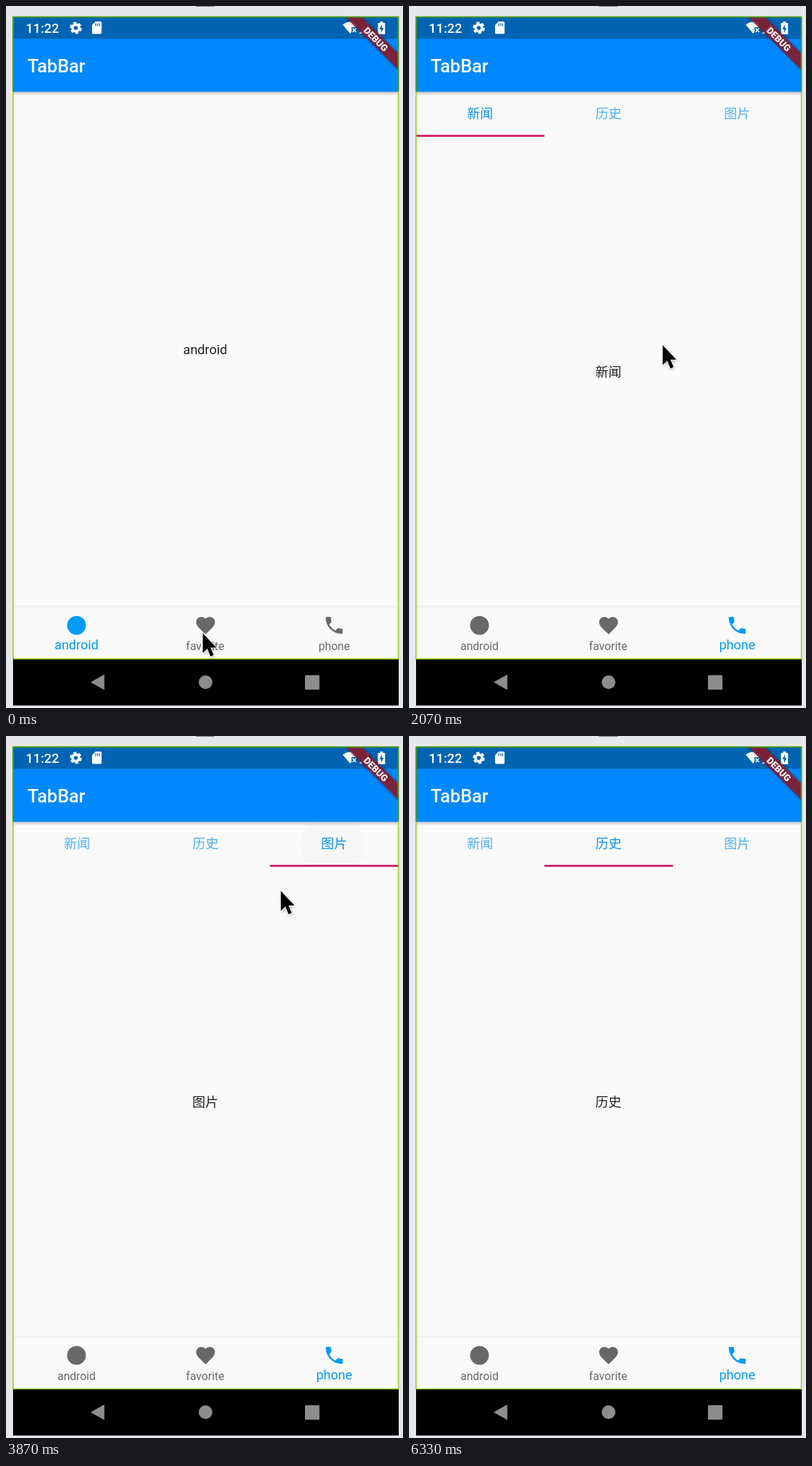
Recreate the animation shown at these times as an HTML page. Size 563 by 994 pixels, loop 6540 ms.

```html
<!DOCTYPE html>
<html lang="en">
<head>
<meta charset="utf-8">
<title>TabBar</title>
<style>
  html, body { margin: 0; width: 100%; height: 100%; overflow: hidden; background: #e7e8ec; }
  svg { display: block; width: 563px; height: 994px; font-family: Roboto, "Noto Sans CJK SC", "Noto Sans CJK", sans-serif; }
  .mid { text-anchor: middle; }
  .page { font-size: 18.5px; fill: #212121; }
  .tab { font-size: 18.5px; fill: #0c94ee; }
</style>
</head>
<body>
<svg viewBox="0 0 563 994">
  <defs>
    <clipPath id="screen"><rect x="10" y="15" width="546.5" height="910"/></clipPath>
    <clipPath id="inkArea"><rect id="inkRect"/></clipPath>
    <linearGradient id="fade" x2="0" y2="1">
      <stop stop-color="#000" stop-opacity=".24"/><stop offset="1" stop-color="#000" stop-opacity="0"/>
    </linearGradient>
    <filter id="soft" x="-50%" y="-50%" width="200%" height="200%"><feGaussianBlur stdDeviation="2.2"/></filter>
  </defs>

  <rect x="268" y="-6" width="29" height="7" rx="3" fill="#77747a"/>
  <rect x="10" y="925" width="547" height="65.5"/>
  <g fill="#8d8d8d">
    <path d="M120 957.5L139.500 946.500V968.500Z"/>
    <circle cx="283" cy="957.500" r="9.700"/>
    <rect x="424" y="947.500" width="20.500" height="20.500" rx="1"/>
  </g>

  <g clip-path="url(#screen)">
    <rect x="10" y="15" width="547" height="910" fill="#fafafa"/>
    <text id="plain" class="mid page" x="282.500" y="493"></text>
    <g id="tabs"></g>
    <rect id="line" y="182.500" width="182.300" height="2.700" fill="#c9125f"/>

    <rect x="10" y="121" width="547" height="6" fill="url(#fade)"/>
    <rect x="10" y="46" width="547" height="75.500" fill="#0089ff"/>
    <rect x="10" y="15" width="547" height="31.500" fill="#0064b2"/>
    <text x="30.500" y="94" font-size="26" font-weight="500" fill="#fff">TabBar</text>
    <text x="28" y="38" font-size="18.600" font-weight="500" fill="#fff">11:22</text>

    <g fill="none" stroke="#fff">
      <circle cx="99" cy="31" r="4.700" stroke-width="3.800"/>
      <circle cx="99" cy="31" r="7" stroke-width="3" stroke-dasharray="4.300 3.030"/>
    </g>
    <path d="M127 22H134Q135.500 22 135.500 23.500V38Q135.500 39.500 134 39.500H123.500Q122 39.500 122 38V27Z" fill="#fff"/>
    <path d="M127.300 24.500v4M130 24.500v4M132.700 24.500v4" stroke="#0064b2" stroke-width="1.200"/>
    <path d="M477.500 26.500Q488 18.500 498.500 26.500L496 30H490V36.500L488 39Z" fill="#fff"/>
    <path d="M491.500 31.500l5 5.500m0-5.500l-5 5.500" stroke="#fff" stroke-width="1.500"/>
    <path d="M500.500 39H514V24Z" fill="#fff"/>
    <path d="M527.500 24H530.500V22H534.500V24H537.500V40H527.500Z" fill="#fff"/>
    <path d="M533 26L529.500 33H532V38L535.500 31H533Z" fill="#0064b2"/>

    <g transform="translate(556.500 15) rotate(45)">
      <rect x="-80" y="37.300" width="160" height="16" opacity=".5" filter="url(#soft)"/>
      <rect x="-80" y="37.300" width="160" height="16" fill="#842139" opacity=".93"/>
      <text class="mid" y="50" font-size="13.200" font-weight="900" fill="#fff">DEBUG</text>
    </g>

    <rect x="10" y="849" width="547" height="3" fill="#f1f1f1"/>
    <rect x="10" y="851.500" width="547" height="73.500" fill="#fafafa"/>
    <g clip-path="url(#inkArea)"><circle id="ink"/></g>
    <g id="nav">
      <g><circle cx="100" cy="877" r="13.300"/><text class="mid" x="100">android</text></g>
      <g>
        <path transform="translate(267 861) scale(1.333)" d="M12 21.35l-1.45-1.32C5.4 15.36 2 12.28 2 8.5 2 5.42 4.42 3 7.5 3c1.74 0 3.41.81 4.5 2.09C13.09 3.81 14.76 3 16.5 3 19.58 3 22 5.42 22 8.5c0 3.78-3.4 6.86-8.55 11.54z"/>
        <text class="mid" x="282.500">favorite</text>
      </g>
      <g>
        <path transform="translate(449.500 861) scale(1.333)" d="M6.62 10.79c1.44 2.83 3.76 5.14 6.59 6.59l2.2-2.2c.27-.27.67-.36 1.02-.24 1.12.37 2.33.57 3.57.57.55 0 1 .45 1 1V20c0 .55-.45 1-1 1-9.39 0-17-7.61-17-17 0-.55.45-1 1-1h3.5c.55 0 1 .45 1 1 0 1.25.2 2.45.57 3.57.11.35.03.74-.25 1.02z"/>
        <text class="mid" x="465.500">phone</text>
      </g>
    </g>
  </g>
  <rect x="10" y="15.500" width="546.500" height="909" fill="none" stroke="#95cc18" stroke-width="1.500"/>
  <path d="M10 121V15.500H556.500V121" fill="none" stroke="#3f9418" stroke-width="1.500"/>

  <g id="cursor">
    <path d="M0 0V28L6.500 22L11 33L15.500 31L11 20.500H19.500Z" transform="translate(1 2)" opacity=".35" filter="url(#soft)"/>
    <path d="M0 0V28L6.500 22L11 33L15.500 31L11 20.500H19.500Z" stroke="#fff" stroke-width="1.800" paint-order="stroke"/>
  </g>
</svg>

<script>
const LOOP = 6540, LEFT = 10, WIDTH = 547, TAB = WIDTH / 3;
const names = ['android', 'favorite', 'phone'];
const titles = ['新闻', '历史', '图片'];
const navClicks = [-1000, 330, 1230];
const tabClicks = [3085, 3560];
const path = [
  [0, 279, 888], [400, 279, 888], [1000, 470, 878], [1470, 478, 876], [1560, 478, 876],
  [2050, 360, 481], [2730, 266, 200], [2960, 280, 150], [3090, 282, 150],
  [3270, 444, 153], [3450, 462, 152], [3640, 462, 152], [4400, 135, 458],
  [4560, 90, 468], [5200, 562, 455], [5300, 610, 455]
];
const swipe = [[4560, 2], [4980, 1.12], [5200, .967], [5250, .967], [5480, 1]];

const $ = id => document.getElementById(id);
const clamp = v => Math.min(1, Math.max(0, v));
const ease = p => 1 - (1 - clamp(p)) ** 3;
const smooth = p => p * p * (3 - 2 * p);
const set = (el, attrs) => { for (const k in attrs) el.setAttribute(k, attrs[k]); };

// Interpolates one column of a list of [time, ...values].
function track(keys, t, col) {
  const i = keys.findIndex(k => k[0] > t);
  if (i < 0) return keys[keys.length - 1][col];
  if (i === 0) return keys[0][col];
  const a = keys[i - 1], b = keys[i];
  return a[col] + (b[col] - a[col]) * smooth((t - a[0]) / (b[0] - a[0]));
}

function scroll(t, duration) {
  if (t >= swipe[0][0]) return track(swipe, t, 1);
  return tabClicks.reduce((sum, c) => sum + ease((t - c) / duration), 0);
}

function label(cls, y, text) {
  const el = document.createElementNS('http://www.w3.org/2000/svg', 'text');
  set(el, { class: 'mid ' + cls, y });
  el.textContent = text;
  return $('tabs').appendChild(el);
}
const tabLabels = titles.map((s, i) => {
  const el = label('tab', 159, s);
  el.setAttribute('x', LEFT + TAB * (i + .5) - .5);
  return el;
});
const pages = titles.map(s => label('page', 525, s));
const navItems = [...$('nav').children];

// Ink splashes: time, centre and the clipped area's left, top, width, height.
const inks = [
  [330, 283, 888, 192, 852, 182, 73], [1230, 465, 888, 374, 852, 182, 73],
  [3085, 282, 152, 192, 122, 182, 63], [3560, 463, 154, 374, 122, 183, 63]
];

function drawInk(t) {
  const hit = inks.filter(k => k[0] <= t).pop();
  const age = hit ? t - hit[0] : 1e4;
  $('ink').setAttribute('opacity', hit ? .035 * clamp((420 - age) / 260) : 0);
  if (!hit) return;
  const [, cx, cy, x, y, width, height] = hit;
  set($('ink'), { cx, cy, r: 46 * ease(age / 280) });
  set($('inkRect'), { x, y, width, height });
}

function draw(t) {
  const active = navClicks.filter(c => c <= t).length - 1;
  navItems.forEach((item, i) => {
    const on = ease((t - navClicks[i]) / 200);
    const off = i < 2 ? ease((t - navClicks[i + 1]) / 200) : 0;
    const s = on - off;
    const mix = (a, b) => Math.round(a + (b - a) * s);
    item.setAttribute('fill', `rgb(${mix(104, 0)},${mix(104, 155)},${mix(104, 244)})`);
    set(item.lastElementChild, { y: 911.5 - .5 * s, 'font-size': 16.1 + 2.4 * s });
  });

  const tabbed = active === 2;
  $('plain').textContent = tabbed ? '' : names[active];
  $('tabs').style.display = $('line').style.display = tabbed ? '' : 'none';
  const page = scroll(t, 300), mark = scroll(t, 180);
  pages.forEach((el, i) => el.setAttribute('x', 282.8 + (i - page) * WIDTH));
  tabLabels.forEach((el, i) => el.setAttribute('opacity', 1 - .28 * clamp(Math.abs(i - mark))));
  $('line').setAttribute('x', LEFT + mark * TAB - .3);

  drawInk(t);
  $('cursor').setAttribute('transform', `translate(${track(path, t, 1)} ${track(path, t, 2)})`);
}

const start = performance.now();
function tick() {
  draw((performance.now() - start) % LOOP);
  requestAnimationFrame(tick);
}
tick();
</script>
</body>
</html>
```
